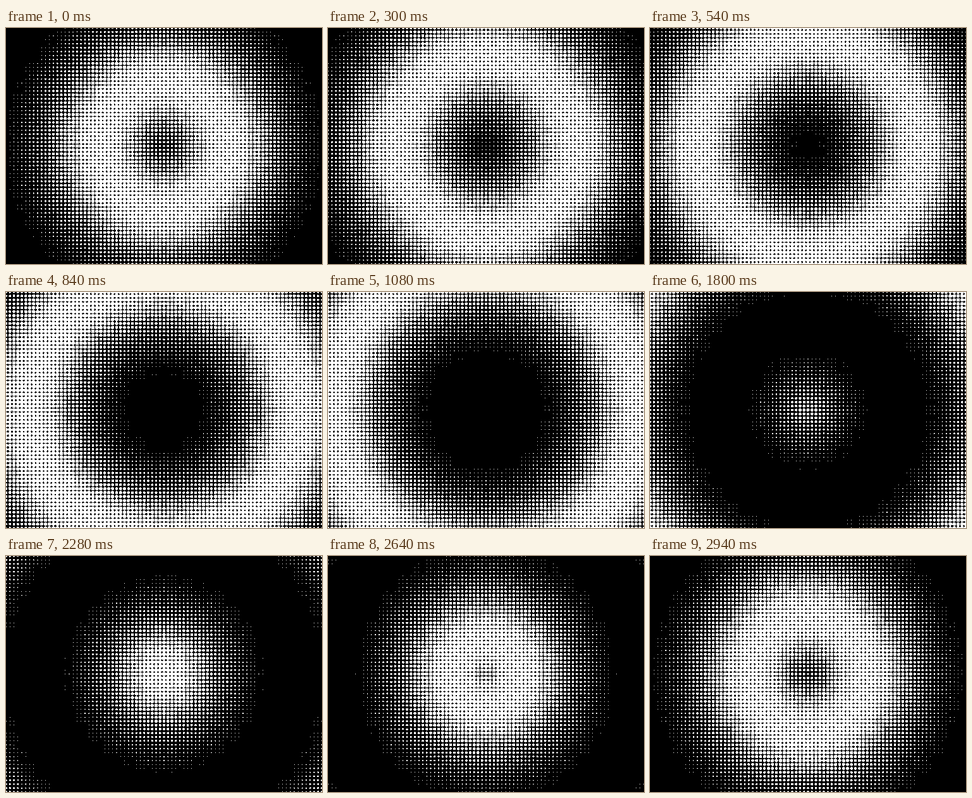
An HTML page with a canvas for the animation above (3 s loop, 500x375 px).

```html
<!DOCTYPE html>
<html lang="en">
<head>
<meta charset="utf-8">
<title>Halftone ripple</title>
<style>
  html, body { margin: 0; width: 100%; height: 100%; overflow: hidden; background: #000; }
  canvas { display: block; width: 500px; height: 375px; }
</style>
</head>
<body>
<canvas id="stage" width="500" height="375"></canvas>
<script>
const WIDTH = 500, HEIGHT = 375;
const LOOP = 3000, STEP = 60;
const GAP = 6.25, WAVELENGTH = 400;
const MAX_RADIUS = GAP / 2;
const INK_LEVEL = 95;
const TAU = Math.PI * 2;

const canvas = document.getElementById('stage');
const ctx = canvas.getContext('2d', { willReadFrequently: true });

const dots = [];
for (let y = 0; y <= HEIGHT; y += GAP) {
  for (let x = 0; x <= WIDTH; x += GAP) {
    dots.push({ x, y, distance: Math.hypot(x - WIDTH / 2, y - HEIGHT / 2) });
  }
}

// The wave travels one wavelength outwards per loop.
function radiusAt(distance, progress) {
  const wave = Math.sin(TAU * (distance / WAVELENGTH - progress));
  return MAX_RADIUS * (1 + wave) / 2;
}

// Turns soft edges into pure black and white.
function harden() {
  const image = ctx.getImageData(0, 0, WIDTH, HEIGHT);
  const pixels = new Uint32Array(image.data.buffer);
  for (let i = 0; i < pixels.length; i++) {
    pixels[i] = (pixels[i] & 255) < INK_LEVEL ? 0xff000000 : 0xffffffff;
  }
  ctx.putImageData(image, 0, 0);
}

function draw(progress) {
  ctx.fillStyle = '#000';
  ctx.fillRect(0, 0, WIDTH, HEIGHT);
  ctx.fillStyle = '#fff';
  ctx.beginPath();
  for (const { x, y, distance } of dots) {
    const radius = radiusAt(distance, progress);
    ctx.moveTo(x + radius, y);
    ctx.arc(x, y, radius, 0, TAU);
  }
  ctx.fill();
  harden();
}

const start = performance.now();
let shown = -1;

function tick() {
  const elapsed = (performance.now() - start) % LOOP;
  const step = Math.floor(elapsed / STEP);
  if (step !== shown) {
    shown = step;
    draw(step * STEP / LOOP);
  }
  requestAnimationFrame(tick);
}

draw(0);
requestAnimationFrame(tick);
</script>
</body>
</html>
```
